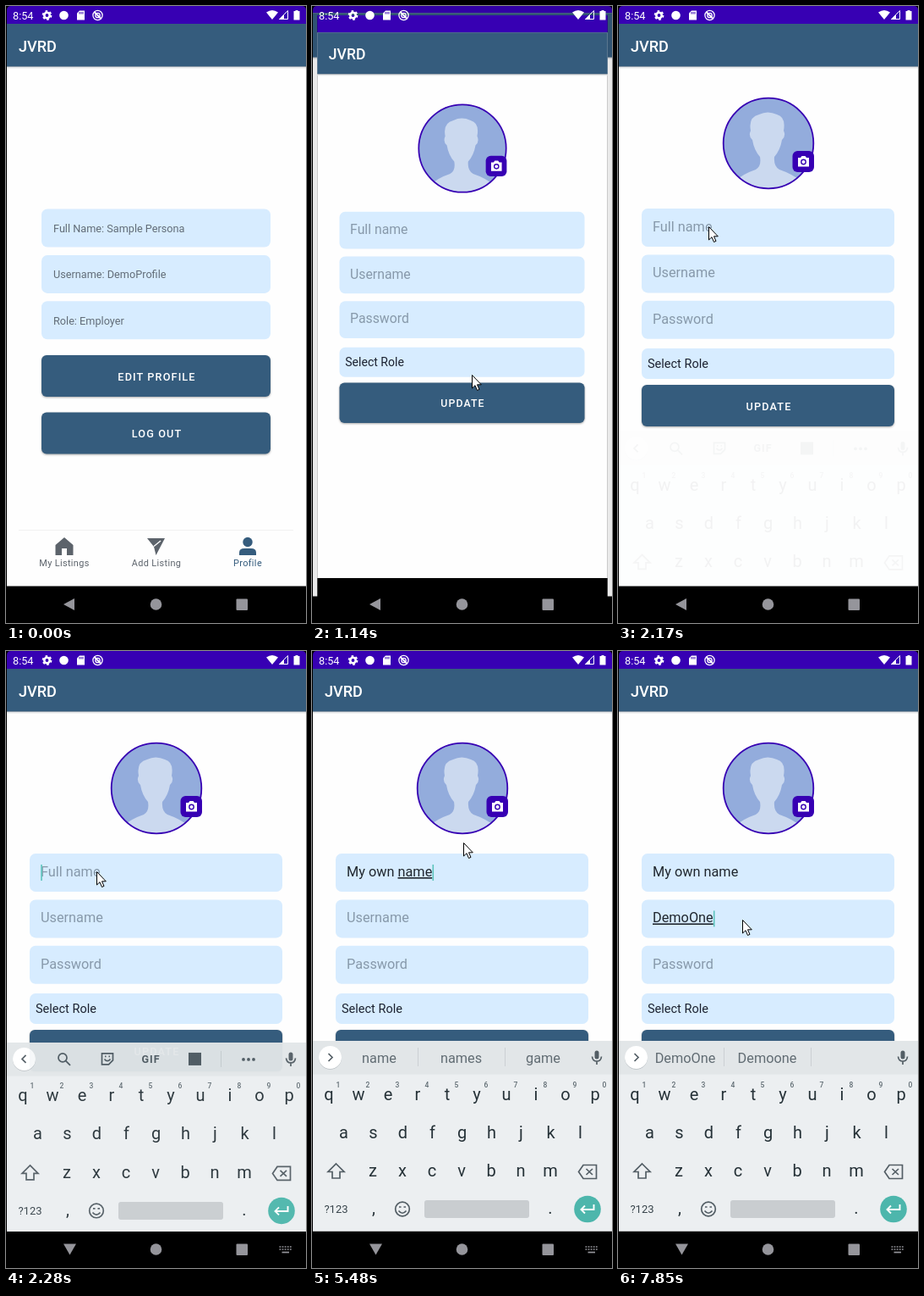
These frames come from a looping animation (355 px wide and 728 px high, 8000 ms). An HTML page:

```html
<!DOCTYPE html>
<html lang="en">
<head>
<meta charset="utf-8">
<title>Edit profile</title>
<style>
html, body { margin: 0; width: 100%; height: 100%; overflow: hidden; background: #000; }
svg { display: block; width: 355px; height: 728px; font-family: Roboto, sans-serif; }
text { white-space: pre; }
.mid { text-anchor: middle; }
.title { font-size: 18.1px; font-weight: 500; fill: #fff; }
.field { fill: #d7ecff; }
.info { font-size: 12.7px; fill: #626d78; }
.btn { fill: #355c7d; filter: drop-shadow(0 1px 1px #0005); }
.btn-label { font-size: 12.7px; font-weight: 500; letter-spacing: 1.13px; fill: #fff; text-anchor: middle; }
.tab { font-size: 10.9px; letter-spacing: .36px; text-anchor: middle; }
.hint { font-size: 16.3px; fill: #8799aa; }
.value { font-size: 16.3px; fill: #20272e; }
.value .word { text-decoration: underline 1px; }
.key { font-size: 20px; fill: #263238; text-anchor: middle; }
.digit { font-size: 8.5px; font-weight: 500; fill: #5f6b72; text-anchor: middle; }
.suggestion { font-size: 16.3px; fill: #616c73; text-anchor: middle; }
.line { fill: none; stroke: #535e65; stroke-width: 1.7; }
.solid { fill: #535e65; }

#home, #edit { transform-origin: 178px 364px; }
#home { animation: recede 8s linear infinite; }
#dim { animation: dim 8s linear infinite; }
#press { animation: press 8s linear infinite; }
#edit { animation: open 8s infinite, reveal 8s linear infinite; }
#keyboard { animation: rise 8s linear infinite; }
#cursor { animation: move 8s linear infinite; }

@keyframes recede {
  0%, 12.5% { transform: scale(1); animation-timing-function: ease-out; }
  14.25% { transform: scale(1.037); animation-timing-function: ease-out; }
  17.4%, 100% { transform: scale(1.05); }
}
@keyframes dim { 0%, 12.5% { opacity: 0; } 14.25%, 100% { opacity: .08; } }
@keyframes press { 0%, 11.1% { opacity: 0; } 11.8%, 13% { opacity: .16; } 14%, 100% { opacity: 0; } }
@keyframes open {
  0%, 12.5% { transform: scale(.85); animation-timing-function: ease-out; }
  14.25% { transform: scale(.97); animation-timing-function: ease-out; }
  17.4%, 100% { transform: scale(1); }
}
@keyframes reveal { 0%, 12.8% { opacity: 0; } 13.7%, 100% { opacity: 1; } }
@keyframes rise {
  0%, 27.1% { transform: translateY(45px); opacity: 0; animation-timing-function: cubic-bezier(.22, 1, .36, 1); }
  30%, 100% { transform: none; opacity: 1; }
}
@keyframes move {
  0%, 4.1% { transform: translate(330px, 730px); animation-timing-function: ease-in-out; }
  8.63%, 17.9% { transform: translate(189px, 435px); }
  19% { transform: translate(135px, 370px); animation-timing-function: ease-out; }
  22.5%, 29.1% { transform: translate(107px, 260px); animation-timing-function: ease-in-out; }
  30.9%, 68.25% { transform: translate(178px, 226px); }
  68.5% { transform: translate(179px, 226px); animation-timing-function: ease-in-out; }
  72.5%, 100% { transform: translate(147px, 317px); }
}
</style>
</head>
<body>
<svg viewBox="0 0 355 728">
  <defs>
    <clipPath id="screen"><path d="M1 728V5Q1 0 6 0H350Q355 0 355 5V728Z"/></clipPath>
    <clipPath id="above-nav"><path d="M0 0H355V685H0Z"/></clipPath>
    <clipPath id="round"><circle cx="178" cy="162" r="53.5"/></clipPath>
    <g id="frame">
      <path d="M1 0H355V728H1Z"/>
      <path d="M1 21H355V684.500H1Z" fill="#fefefe"/>
      <path d="M1 0H355V21H1Z" fill="#3700b3"/>
      <path d="M1 71H355V72.300H1Z" fill="#a3abb3"/>
      <path d="M1 72.300H355V73.500H1Z" fill="#e4e6e8"/>
      <path d="M1 21H355V71.300H1Z" fill="#355c7d"/>
      <text class="title" x="15" y="54">JVRD</text>
    </g>
  </defs>
  <g clip-path="url(#screen)">
    <g id="home">
      <use href="#frame"/>
      <g id="infos"></g>
      <rect class="btn" x="42" y="412" width="271" height="49" rx="6"/>
      <rect id="press" x="42" y="412" width="271" height="49" rx="6" fill="#fff"/>
      <text class="btn-label" x="178.5" y="441.5">EDIT PROFILE</text>
      <rect class="btn" x="42" y="479.500" width="271" height="49" rx="6"/>
      <text class="btn-label" x="178.5" y="509">LOG OUT</text>
      <path d="M15 618.500H340" stroke="#f1f1f1"/>
      <g fill="#5c636b">
        <path d="M69 627L79.500 636V648H72V640H66V648H58.500V636Z"/>
        <path d="M167 628H188L177.500 648L175 638Z"/>
        <path d="M175 637.500L183 631" stroke="#fff" stroke-width="1.300"/>
        <text class="tab" x="69" y="661">My Listings</text>
        <text class="tab" x="178" y="661">Add Listing</text>
      </g>
      <g fill="#355c7d">
        <circle cx="286" cy="632.500" r="5.700"/>
        <path d="M276 648V645Q276 640 282 640H290Q296 640 296 645V648Z"/>
        <text class="tab" x="286" y="661">Profile</text>
      </g>
    </g>
    <path id="dim" d="M0 0H355V728H0Z"/>
    <g id="edit">
      <use href="#frame"/>
      <circle cx="178" cy="162" r="53.500" fill="#93acdc"/>
      <path clip-path="url(#round)" fill="#cbd9ef" d="M138 207Q148 198 163 193Q170 189 168 178Q161 170 159 158Q154 154 157 147Q154 131 167 128Q177 123 188 128Q199 131 196 147Q199 154 194 158Q192 170 185 178Q184 189 191 193Q206 198 217 207V220H138Z"/>
      <circle cx="178" cy="162" r="53.300" fill="none" stroke="#3700b3" stroke-width="1.800"/>
      <rect x="206.500" y="171" width="25.500" height="25" rx="6" fill="#3700b3"/>
      <path d="M213 179H216L217.500 177H221.500L223 179H226V189.500H213Z" fill="#fff"/>
      <circle cx="219.500" cy="184" r="2.700" fill="#fff" stroke="#3700b3" stroke-width="1.400"/>
      <g id="inputs"></g>
      <rect class="field" x="28" y="404" width="299" height="36" rx="7"/>
      <text x="35" y="427" font-size="14.5" fill="#1c2230">Select Role</text>
      <rect class="btn" x="28" y="447" width="299" height="49" rx="6"/>
      <text class="btn-label" x="178.5" y="476.5">UPDATE</text>
      <path id="caret" d="M0 252V271" stroke="#5cc4bd" stroke-width="1.600"/>
    </g>
    <g clip-path="url(#above-nav)">
      <g id="keyboard">
        <path d="M1 460H355V500H1Z" fill="#e2e6e8"/>
        <path d="M1 499.500H355V684.500H1Z" fill="#eceff1"/>
        <circle cx="21.500" cy="480.300" r="13.500" fill="#b9bfc3"/>
        <circle cx="21.500" cy="479.500" r="13.500" fill="#fff"/>
        <path id="chevron" class="line"/>
        <g id="tools">
          <circle class="line" cx="67" cy="478" r="5"/>
          <path class="line" d="M70.500 481.500L76 487" stroke-width="2"/>
          <path class="line" d="M113.500 473H126.500V481L121.500 486H113.500Z"/>
          <path class="line" d="M116.500 479.500Q120 484 123.500 479.500M117 476.500H118.500M121.500 476.500H123" stroke-width="1.300"/>
          <text class="mid solid" x="171.500" y="484" font-size="12.500" font-weight="700" letter-spacing="1">GIF</text>
          <rect class="solid" x="216" y="472" width="15" height="15"/>
          <path d="M254.500 470V489" stroke="#cbd0d3"/>
          <g class="solid"><circle cx="281" cy="480" r="1.900"/><circle cx="287" cy="480" r="1.900"/><circle cx="293" cy="480" r="1.900"/></g>
        </g>
        <g id="words">
          <path d="M125.500 468V490M228.500 468V490" stroke="#cbd0d3"/>
          <text class="suggestion" x="79.5" y="486"></text>
          <text class="suggestion" x="176.5" y="486"></text>
          <text class="suggestion" x="273.5" y="486"></text>
        </g>
        <rect class="solid" x="334.500" y="471.500" width="5" height="10" rx="2.500"/>
        <path class="line" d="M331.500 478.500Q332 484 337 484Q342 484 342.500 478.500M337 484V488"/>
        <g id="keys"></g>
        <path class="line" d="M28.500 605L38 614.500H33V622H24V614.500H19Z"/>
        <path class="line" d="M321 606.500H336.500V622.500H321L315.500 614.500ZM324.500 611L332 618M332 611L324.500 618"/>
        <text class="mid" x="28.5" y="663" font-size="13" fill="#37434a">?123</text>
        <circle class="line" cx="107" cy="658.500" r="8.300"/>
        <path class="line" d="M102.500 660.500Q107 666 111.500 660.500M103 656H105.500M108.500 656H111"/>
        <rect x="133" y="648" width="124" height="21" rx="3" fill="#c9cdd0"/>
        <circle cx="326" cy="658.500" r="15.800" fill="#4db6ac"/>
        <path d="M333.500 653V659H319M323 654.500L318.500 659L323 663.500" fill="none" stroke="#fff" stroke-width="1.900"/>
      </g>
    </g>
    <g fill="#fff">
      <text x="8" y="15.500" font-size="12.700">8:54</text>
      <circle cx="48.500" cy="11" r="3.200" fill="none" stroke="#fff" stroke-width="2.600"/>
      <circle cx="48.500" cy="11" r="5" fill="none" stroke="#fff" stroke-width="1.800" stroke-dasharray="2.600 2.636"/>
      <circle cx="68.500" cy="11" r="5.300"/>
      <path d="M87 5.500H93V16.500H84V8.500Z"/>
      <path d="M87 7V9.500M89 7V9.500M91 7V9.500" stroke="#3700b3"/>
      <g fill="none" stroke="#fff" stroke-width="1.300"><circle cx="108.500" cy="11" r="5.600"/><circle cx="108.500" cy="11" r="2.700"/><path d="M104.500 7L112.500 15" stroke-width="1.800"/></g>
      <path d="M308 7.500Q315 2.500 322 7.500L315 16Z"/>
      <path d="M333.500 5.500V15.500H323.500Z" fill="none" stroke="#fff"/>
      <path d="M329 10V16H323Z"/>
      <path d="M342.500 5H345.500V6H347.500V16.500H340.500V6H342.500Z"/>
    </g>
    <g fill="#95959b">
      <path id="back"/>
      <circle cx="177.500" cy="706" r="6.800"/>
      <rect x="272.500" y="699.500" width="13.500" height="13.500" rx="1"/>
      <g id="switcher" stroke="#95959b" stroke-width="1.700">
        <path d="M323.500 703H338M323.500 706H338" stroke-dasharray="1.800 1.300"/>
        <path d="M326.500 709.500H335"/>
      </g>
    </g>
  </g>
  <path id="cursor" d="M.5 .5V16L4 12.700L6.500 18.500L9 17.400L6.500 11.800H11.300Z" fill="#fff" stroke="#000"/>
</svg>
<script>
const LOOP = 8000;
const $ = id => document.getElementById(id);
const label = (cls, x, y, s) => `<text class="${cls}" x="${x}" y="${y}">${s}</text>`;
const box = (x, y, w) => `<rect class="field" x="${x}" y="${y}" width="${w}" height="45" rx="7"/>`;

$('infos').innerHTML = ['Full Name: Sample Persona', 'Username: DemoProfile', 'Role: Employer']
  .map((s, i) => box(42, 239.5 + i * 54.4, 271) + label('info', 56, 267 + i * 54.4, s)).join('');

$('inputs').innerHTML = ['Full name', 'Username', 'Password']
  .map((s, i) => box(28, 239 + i * 54.4, 299) + label('hint', 41, 266 + i * 54.4, s) + label('value', 41, 266 + i * 54.4, '')).join('');

const row = (letters, x, y) => [...letters].map((c, i) => label('key', x + i * 35, y, c)).join('');
$('keys').innerHTML = row('qwertyuiop', 20, 529.5) + row('asdfghjkl', 37.5, 574.5) + row('zxcvbnm', 72, 620) +
  row(',', 73, 664) + row('.', 282, 664) +
  [...'1234567890'].map((c, i) => label('digit', 31 + i * 35, 514.5, c)).join('');

const fields = [
  { text: 'My own name', times: [3930, 4060, 4290, 4350, 4410, 4530, 4700, 4780, 4860, 4920, 4980] },
  { text: 'DemoOne', times: [6950, 7100, 7150, 7480, 7650, 7750, 7850] }
];
// An empty list of words shows the toolbar.
const suggestions = [
  [0, ''], [4060, 'My Mum Myself'], [4290, 'name own new'], [4350, 'on of our'], [4410, 'own owner owns'],
  [4700, 'name and house'], [4780, 'new not now'], [4860, 'name nail nature'], [4920, 'name names named'],
  [4980, 'name names game'], [6000, ''], [6950, 'D Do Dear'], [7100, 'De Dear Den'], [7150, 'Dem Demo Den'],
  [7480, 'Demo Demos Den'], [7650, 'DemoO Demo'], [7750, 'DemoOn Demon'], [7850, 'DemoOne Demoone']
];
const caretOn = [[2180, 2550], [3080, 3570], [3930, 5500], [6040, 6540], [6950, LOOP]];

const hints = document.querySelectorAll('.hint');
const values = document.querySelectorAll('.value');
const words = document.querySelectorAll('.suggestion');
const show = (el, on) => { el.style.display = on ? '' : 'none'; };

function draw(t) {
  const active = t < 6000 ? 0 : 1;
  fields.forEach(({ text, times }, i) => {
    const typed = text.slice(0, times.filter(at => at <= t).length);
    const cut = typed.lastIndexOf(' ') + 1;
    const composing = i === active ? 'word' : '';
    values[i].innerHTML = typed.slice(0, cut) + `<tspan class="${composing}">${typed.slice(cut)}</tspan>`;
    show(hints[i], !typed);
  });

  const length = values[active].getComputedTextLength();
  $('caret').setAttribute('transform', `translate(${42 + length} ${active * 54.4})`);
  show($('caret'), caretOn.some(([from, to]) => t >= from && t < to));

  const current = suggestions.filter(([at]) => at <= t).pop()[1];
  current.split(' ').concat('', '').slice(0, 3).forEach((s, i) => { words[i].textContent = s; });
  show($('words'), current);
  show($('tools'), !current);
  $('chevron').setAttribute('d', current ? 'M19.500 475L24 479.500L19.500 484' : 'M23.500 475L19 479.500L23.500 484');

  const typing = t >= 2180;
  $('back').setAttribute('d', typing ? 'M68 699.500H83L75.500 712.500Z' : 'M68 706L81 699V713Z');
  show($('switcher'), typing);
}

let start;
function tick(now) {
  start ??= now;
  draw((now - start) % LOOP);
  requestAnimationFrame(tick);
}
draw(0);
requestAnimationFrame(tick);
</script>
</body>
</html>
```
